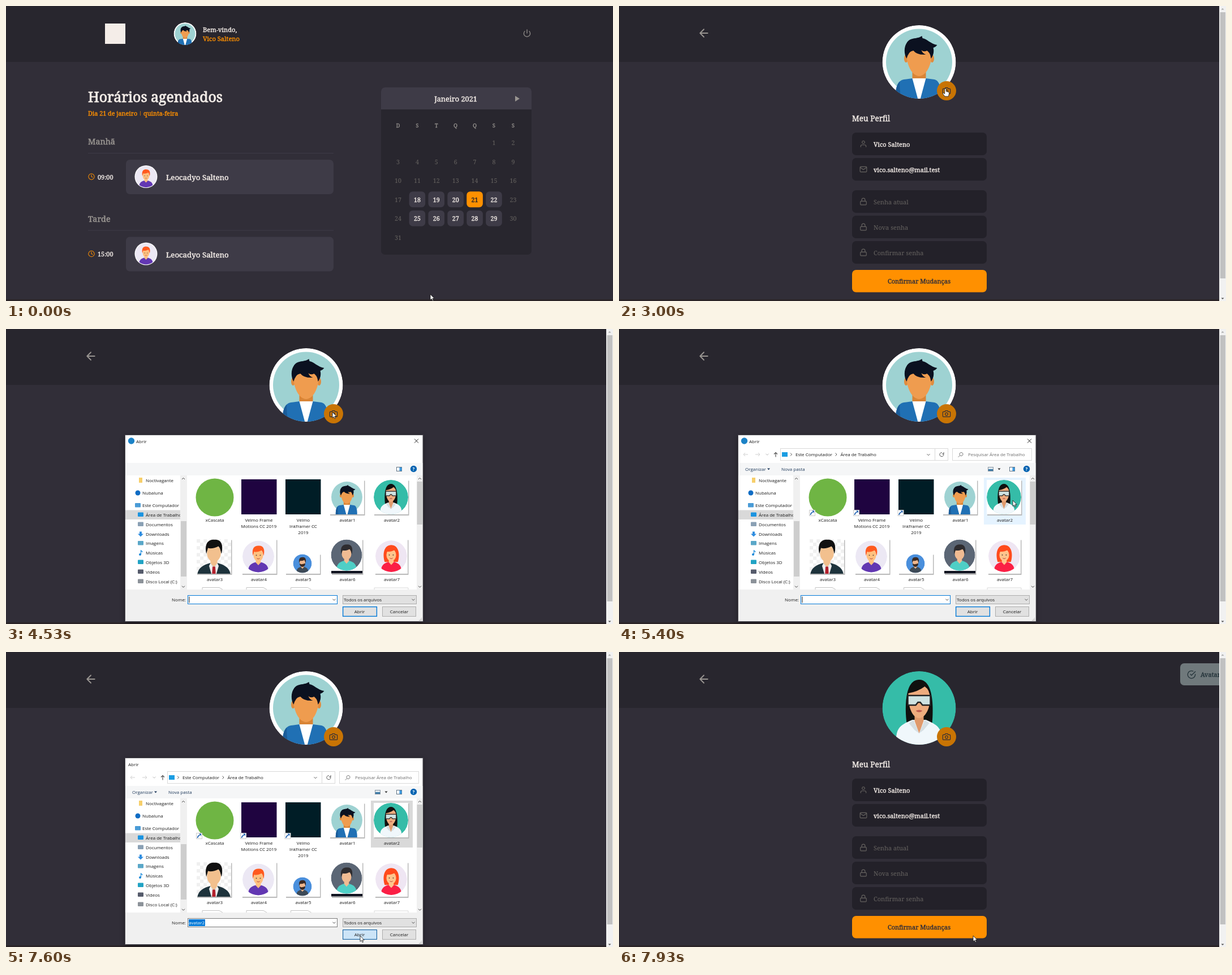
These frames come from a looping animation (1073 px wide and 522 px high, 8000 ms). An HTML page:

```html
<!DOCTYPE html>
<html lang="pt-BR">
<head>
<meta charset="utf-8">
<title>Perfil</title>
<style>
html, body { margin: 0; width: 100%; height: 100%; overflow: hidden; background: #312e38; }
svg { display: block; width: 100%; height: 100%; font-family: "Noto Serif", serif; }
#dialog, #status { font-family: "Open Sans", sans-serif; }
#dialog { filter: drop-shadow(0 2px 4px #0006); }
</style>
</head>
<body>
<svg id="stage" viewBox="0 0 1073 522"></svg>
<script>
const ORANGE = '#ff9000', LIGHT = '#f4ede8', GRAY = '#999591', DIM = '#666360',
  DARK = '#28262e', CARD = '#3e3b47', BLUE = '#0078d7';
const MID = 'text-anchor="middle"';

// Drawing helpers
const text = (x, y, size, fill, str, extra = '') =>
  `<text x="${x}" y="${y}" font-size="${size}" fill="${fill}" ${extra}>${str}</text>`;
const medium = (x, y, size, fill, str, extra = '') =>
  text(x, y, size, fill, str, `stroke="${fill}" stroke-width="${size * .035}" ${extra}`);
const rect = (x, y, w, h, fill, r = 0, extra = '') =>
  `<rect x="${x}" y="${y}" width="${w}" height="${h}" rx="${r}" fill="${fill}" ${extra}/>`;
const box = (x, y, w, h, fill, stroke, extra = '') =>
  rect(x + .5, y + .5, w - 1, h - 1, fill, 0, `stroke="${stroke}" ${extra}`);
const circle = (x, y, r, fill) => `<circle cx="${x}" cy="${y}" r="${r}" fill="${fill}"/>`;
const oval = (x, y, rx, ry, fill) => `<ellipse cx="${x}" cy="${y}" rx="${rx}" ry="${ry}" fill="${fill}"/>`;
const shape = (d, fill, extra = '') => `<path d="${d}" fill="${fill}" ${extra}/>`;
const line = (d, stroke, w = 1) => shape(d, 'none', `stroke="${stroke}" stroke-width="${w}"`);
const group = (id, ...parts) => `<g id="${id}">${parts.join('')}</g>`;
const icon = (x, y, size, color, d) =>
  `<g transform="translate(${x - size / 2} ${y - size / 2}) scale(${size / 24})" stroke-linecap="round" stroke-linejoin="round">${line(d, color, 2)}</g>`;
const chevron = (x, y, color = '#555') => line(`M${x - 2.5} ${y - 1.3}l2.5 2.5 2.5-2.5`, color);
const next = (x, y) => line(`M${x - 1} ${y - 2.5}l2.5 2.5-2.5 2.5`, '#555');

const ICON = {
  power: 'M18.36 6.64a9 9 0 1 1-12.73 0M12 2v10',
  clock: 'M12 2a10 10 0 1 0 .01 0M12 6v6l4 2',
  back: 'M19 12H5M12 19l-7-7 7-7',
  user: 'M20 21v-2a4 4 0 0 0-4-4H8a4 4 0 0 0-4 4v2M12 3a4 4 0 1 0 .01 0',
  mail: 'M4 4h16a2 2 0 0 1 2 2v12a2 2 0 0 1-2 2H4a2 2 0 0 1-2-2V6a2 2 0 0 1 2-2zM22 6l-10 7L2 6',
  lock: 'M5 11h14a2 2 0 0 1 2 2v7a2 2 0 0 1-2 2H5a2 2 0 0 1-2-2v-7a2 2 0 0 1 2-2zM7 11V7a5 5 0 0 1 10 0v4',
  camera: 'M23 19a2 2 0 0 1-2 2H3a2 2 0 0 1-2-2V8a2 2 0 0 1 2-2h4l2-3h6l2 3h4a2 2 0 0 1 2 2zM12 9a4 4 0 1 0 .01 0',
  check: 'M22 11.08V12a10 10 0 1 1-5.93-9.14M22 4 12 14.01l-3-3'
};

// Avatars, drawn around 0,0 with radius 65
const man = circle(0, 0, 65, '#fff') + circle(0, 0, 58.5, '#9ed2d2') +
  shape('M-42 66C-42 44-38 33-27 31L-12 29H12L27 31C36 33 39 45 39 66Z', '#2070b4') +
  shape('M-42 66C-42 48-39 38-34 35C-35 46-33 54-32 66Z', '#1a5c99') +
  shape('M-12 29H12L2 66H-2Z', '#fff') +
  shape('M-12 14H12V29H-12Z', '#d98435') +
  oval(-23, -6, 3.5, 7, '#e08c3e') + oval(23, -6, 3.5, 7, '#e08c3e') +
  shape('M-22-24H22C25 0 14 25 0 25S-25 0-22-24Z', '#ef9c4f') +
  shape('M-22-6C-28-16-27-32-17-39C-10-43-2-41 5-46L6-42C14-41 20-32 32-30Q29-26 25-25C27-18 25-11 21-6C20-13 19-16 14-20Q8-17 4-21Q6-15 12-13Q-4-12-10-20Q-16-19-18-15Q-21-11-22-6Z', '#0b1120');

const woman = circle(0, 0, 65, '#35bca8') +
  shape('M-22 27C-25 5-27-50 0-50S25 5 23 27Z', '#10110f') +
  shape('M-41 66C-41 38-38 32-12 21H12C38 32 40 38 41 66Z', '#f0f7fb') +
  shape('M-8 10H8V23L0 45-8 23Z', '#e09a6c') +
  shape('M-19-26Q-2-29 10-38Q19-32 19-18C20 2 10 18 0 18S-20 2-19-26Z', '#eeac7e') +
  shape('M-10 21L0 45-8 39-18 27ZM10 21L0 45 8 39 18 27Z', '#d6dfe3') +
  shape('M-20-22H20V-5H6L2-10H-2L-6-5H-20Z', '#cfe3e2', 'stroke="#222" stroke-width="2.5"') +
  shape('M-6 5Q0 2 6 5Q0 10-6 5Z', '#bf5b4f');

const person = (bg, hair, skin, shirt, { w = 42, long = 0, face = 0, beard = 0, tie = 0 } = {}) =>
  (bg ? circle(0, 0, 65, bg) : '') +
  (long ? shape('M-27 24C-38-12-28-46 0-46S38-12 27 24Z', hair) : '') +
  shape(`M${-w} 66C${-w} 38-32 30-12 24H12C32 30 ${w} 38 ${w} 66Z`, shirt) +
  shape('M-10 6H10V25L0 36-10 25Z', skin) +
  (tie ? shape('M-10 24L0 36 10 24 14 32 4 66H-4L-14 32Z', '#eee') + shape('M-4 34H4L6 66H-6Z', '#b3202c') : '') +
  oval(0, -5, 20, 25, skin) +
  (beard ? shape('M-20-2Q-14 7 0 4T20-2C20 32-20 32-20-2Z', hair) : '') +
  shape('M-22-3C-28-34-16-45 2-44C22-45 28-28 22-3C19-12 19-19 13-25C4-20-10-17-17-20C-19-13-20-10-22-3Z', hair) +
  (face ? circle(-8, -5, 2.2, '#333') + circle(8, -5, 2.2, '#333') + line('M-6 8Q0 13 6 8', '#a33', 2) : '');

const redhead = person('#ece8f4', '#ff5a1f', '#ffc07f', '#6237b2', { face: 1 });
const suit = `<g transform="translate(0 -6) scale(1.3)">${person('', '#111', '#f2c08e', '#1e333c', { w: 49, tie: 1 })}</g>`;
const avatar = (x, y, r, art, clip = 'round') =>
  `<g transform="translate(${x} ${y}) scale(${r / 65})"><g clip-path="url(#${clip})">${art}</g></g>`;

// Dashboard
const appointment = (title, time, y) =>
  medium(145, y - 57, 14.3, GRAY, title) +
  rect(145, y - 42, 434, 1, CARD) +
  rect(212, y - 30, 367, 61, CARD, 7) +
  icon(151, y, 12.5, ORANGE, ICON.clock) +
  medium(162, y + 4.5, 10.9, LIGHT, time) +
  circle(247.5, y, 20, '#fff') + avatar(247.5, y, 19, redhead) +
  medium(283, y + 6, 13.3, LIGHT, 'Leocadyo Salteno');

function calendar() {
  let s = rect(663, 144, 266, 296, DARK, 7) +
    shape('M663 183V151a7 7 0 0 1 7-7H922a7 7 0 0 1 7 7V183Z', CARD) +
    medium(795, 168.5, 12.7, LIGHT, 'Janeiro 2021', MID) +
    shape('M900 159V169L908 164Z', GRAY);
  [...'DSTQQSS'].forEach((d, i) => s += medium(693 + 33.9 * i, 214.5, 9, GRAY, d, MID));
  for (let day = 1; day <= 31; day++) {
    const col = (day + 4) % 7, x = 693 + 33.9 * col, y = 242 + 33.5 * Math.floor((day + 4) / 7);
    const open = day > 17 && day < 30 && col > 0 && col < 6, chosen = day === 21;
    if (open) s += rect(x - 14.3, y - 14.3, 28.6, 28, chosen ? ORANGE : CARD, 6.5);
    s += (open ? medium : text)(x, y + 4, 10.7, chosen ? '#232129' : open ? LIGHT : DIM, day, MID);
  }
  return s;
}

const dashboard = group('dashboard',
  rect(0, 0, 1073, 99, DARK),
  rect(175, 31, 36, 36, LIGHT),
  avatar(316.5, 49, 20, man),
  medium(348, 45.5, 11.1, LIGHT, 'Bem-vindo,'),
  medium(348, 62, 11.1, ORANGE, 'Vico Salteno'),
  icon(921, 48, 15, GRAY, ICON.power),
  medium(145, 170, 24.9, LIGHT, 'Horários agendados'),
  medium(145, 194, 10.8, ORANGE, 'Dia 21 de janeiro'),
  rect(237, 186, 1, 8, '#b86c0c'),
  medium(243, 194, 10.8, ORANGE, 'quinta-feira'),
  appointment('Manhã', '09:00', 302), appointment('Tarde', '15:00', 438.5),
  calendar());

// Profile
const field = (y, ic, str, color) =>
  rect(412, y, 238, 40, '#232129', 7) + icon(432, y + 20, 14, DIM, ICON[ic]) +
  (color === LIGHT ? medium : text)(450, y + 24.5, 11, color, str);

const profile = group('profile',
  rect(0, 0, 1061, 99, DARK),
  icon(150, 48, 23, GRAY, ICON.back),
  group('before', avatar(530.5, 99, 65, man)),
  group('after', avatar(530.5, 99, 65, woman)),
  `<circle id="shot" cx="579" cy="150" r="17"/>`,
  icon(579, 150, 14.5, '#312e38', ICON.camera),
  medium(412, 203.5, 13.6, LIGHT, 'Meu Perfil'),
  field(224, 'user', 'Vico Salteno', LIGHT),
  field(269, 'mail', 'vico.salteno@mail.test', LIGHT),
  field(326, 'lock', 'Senha atual', DIM),
  field(371, 'lock', 'Nova senha', DIM),
  field(416, 'lock', 'Confirmar senha', DIM),
  rect(412, 467, 238, 39.5, ORANGE, 7),
  medium(530.5, 491.3, 11, '#312e38', 'Confirmar Mudanças', MID),
  group('toast',
    rect(0, 20, 252, 39, '#e6fffa', 7),
    icon(20, 40, 16, '#1d4a4e', ICON.check),
    medium(36, 44, 11, '#1d4a4e', 'Avatar atualizado!')));

const scrollbar = group('scroll',
  rect(1061, 0, 12, 522, '#f1f1f1'), rect(1062.5, 11, 9.5, 471, '#c1c1c1'),
  shape('M1064.500 6.500L1067 4 1069.500 6.500Z', '#a3a3a3'), shape('M1064.500 516.500L1067 519 1069.500 516.500Z', '#505050'));

// File dialog
const label = (x, y, str, extra = '') => text(x, y, 8, '#1a1a1a', str, extra);
const places = [
  [267.5, 'Noctivagante', '#f7cf6b'], [290, 'Nubaluna', '#0f6cc4', 1], [312, 'Este Computador', '#4a9bd6', 1],
  [328.5, 'Área de Trabalho', '#1b94e0'], [345.5, 'Documentos', '#8aa0b4'], [362.5, 'Downloads', '#2f8de0'],
  [379, 'Imagens', '#5aa7c8'], [396, 'Músicas', '#1687d9'], [412.5, 'Objetos 3D', '#21a3c4'],
  [429.5, 'Vídeos', '#555b6b'], [446.5, 'Disco Local (C:)', '#8c9299']
];
const placeMark = (x, y, name, color) =>
  name === 'Nubaluna' ? circle(x + 5, y, 4.5, color) :
  name === 'Downloads' ? shape(`M${x + 3} ${y - 4}h4v4h3l-5 5-5-5h3z`, color) :
  name === 'Músicas' ? circle(x + 4, y + 3, 2, color) + line(`M${x + 5.5} ${y + 3}v-7l3 2.5`, color, 1.2) :
  name === 'Noctivagante' ? rect(x + 2, y - 4.5, 6, 9, color) : rect(x, y - 4, 10, 7.5, color, 1);

const nav = rect(211, 320.5, 97, 16.5, '#d9d9d9') +
  places.map(([y, name, color, outer]) =>
    placeMark(outer ? 228 : 233, y, name, color) + label(outer ? 241 : 247, y + 3, name)).join('') +
  rect(308, 259, 12, 202, '#f0f0f0') + rect(309, 340, 10, 98, '#cdcdcd') +
  line('M311 266l2.5-2.5 2.5 2.5', '#444') + chevron(313.5, 456, '#444');

const cols = [369, 447, 525.5, 603.5, 682];
const frame = (x, y, w = 61, h = 61) => rect(x + 1, y + 1.5, w + .5, h + .5, '#b9b9b9') + rect(x, y, w, h, '#fff');

function files() {
  let s = circle(369, 298, 33.5, '#6fb544') + rect(416, 266, 62.5, 62, '#1f0440') + rect(494, 266, 62.5, 62, '#001d26');
  s += frame(572, 267) + avatar(602.5, 297.5, 30.5, man, 'square');
  s += frame(650, 267) + avatar(680.5, 297.5, 30.5, woman);
  s += frame(337, 372);
  for (let i = 0; i < 50; i++) s += rect(337 + i % 5 * 12.2 + (Math.floor(i / 5) % 2) * 6.1, 372 + Math.floor(i / 5) * 6.1, 6.1, 6.1, '#f0f0f0');
  s += avatar(367.5, 402.5, 30.5, suit, 'square');
  s += frame(417, 372) + avatar(446, 402.5, 28, redhead);
  s += frame(494, 398, 61, 35) + avatar(524, 415, 16.5, person('#4a8fdc', '#3b2a24', '#f0b78d', '#3d4a57', { beard: 1 }));
  s += frame(575, 372, 55) + avatar(602, 400, 27.5, person('#5b6675', '#2e2c2f', '#f0bb92', '#4fcfc6')) + rect(575, 428, 55, 4.5, '#10131f');
  s += frame(652, 372, 58) + avatar(681, 402, 28, person('#efe6f3', '#ff4a1c', '#ffc48c', '#fb1f45', { long: 1, face: 1 }));
  cols.slice(0, 3).forEach(x => s += line(`M${x - 22} 461V457.500H${x + 8}L${x + 14} 461`, '#c4c4c4'));
  s += line('M651 461V458H711V461', '#d8d8d8');
  [['xCascata'], ['Velmo Frame', 'Motions CC 2019'], ['Velmo', 'Inkframer CC', '2019'], ['avatar1'], ['avatar2']]
    .forEach((rows, i) => rows.forEach((row, j) => s += label(cols[i], 341 + 11 * j, row, MID)));
  cols.forEach((x, i) => s += label(x, 446, 'avatar' + (i + 3), MID));
  return s;
}

const shortcuts = group('shortcuts', ...cols.slice(0, 3).map(x =>
  box(x - 33, 320, 11, 11, '#fff', '#ccc') + line(`M${x - 30.5} 329Q${x - 30} 325 ${x - 26} 324`, '#1c5fb0', 1.8) +
  shape(`M${x - 28} 321.500h4v4z`, '#1c5fb0')));

const address = group('address',
  line('M228 222H220M223 219l-3 3 3 3M241 222h8M246 219l3 3-3 3', '#cfcfcf'), chevron(262, 222, '#bbb'),
  line('M277 226.500V218.500M274 221.500l3-3 3 3', '#555', 1.2),
  box(285, 211, 297, 22, '#fff', '#d9d9d9'), rect(558, 211, 1, 22, '#d9d9d9'),
  rect(288, 218, 10, 8, '#1b9de2'), next(304, 222), label(312, 225, 'Este Computador'),
  next(383.5, 222), label(391.5, 225, 'Área de Trabalho'), chevron(547, 222.500),
  line('M573.500 220.500a3.500 3.500 0 1 1-2.500-1.800M574 218v3h-3', '#555'),
  box(589, 211, 141, 22, '#fff', '#d9d9d9'),
  line('M605 218.500a3 3 0 1 0 .01 0M602.700 223.700l-3 3', '#777'),
  text(617, 225, 7.9, '#6d6d6d', 'Pesquisar Área de Trabalho'),
  text(223, 251, 8, '#1e395b', 'Organizar'), shape('M262 246.500h5l-2.500 3z', '#1e395b'),
  text(287, 251, 8, '#1e395b', 'Nova pasta'),
  box(652, 244, 10, 8, '#dfe8ee', '#8a97a3'), rect(653, 248, 8, 3, '#3c7ba8'), shape('M669.500 246.500h5l-2.500 3z', '#333'));

const dialog = group('dialog',
  rect(210, 187, 527.5, 331, '#55535a'),
  rect(211, 188, 525.5, 329, '#fff'),
  rect(211, 461, 525.5, 56, '#f0f0f0'),
  group('mark', circle(221.5, 198, 5.7, '#1b82c6'), line('M722 194.500l7 7M729 194.500l-7 7', '#222')),
  `<text id="caption" y="201.500" font-size="8" fill="#1a1a1a">Abrir</text>`,
  group('content',
    rect(211, 237, 525.5, 22, '#f5f6f7'),
    box(690, 244, 10, 8, '#fff', '#5f7283'), rect(695.5, 245, 4, 6, '#3d9ae0'),
    circle(720.5, 247.5, 5.7, '#0063b1'), text(720.5, 250.5, 8, '#fff', '?', MID + ' font-weight="700"'),
    nav,
    `<rect id="tile" x="645.500" y="263.500" width="73" height="82"/>`,
    files(),
    rect(726, 259, 10.5, 202, '#f0f0f0'), rect(726.5, 270, 10, 76, '#cdcdcd'),
    line('M729 266l2.500-2.500 2.500 2.500', '#444'), chevron(731.5, 456, '#444')),
  shortcuts, address,
  label(318, 482, 'Nome:', 'text-anchor="end"'),
  box(321, 471, 265, 16, '#fff', BLUE, 'id="name"'), chevron(580, 479),
  rect(323, 473, 29, 12, BLUE, 0, 'id="marked"'),
  `<text id="file" x="323" y="482" font-size="8">avatar2</text>`,
  rect(323.5, 473.5, .9, 11, '#000', 0, 'id="caret"'),
  box(595, 471, 131, 16, '#e1e1e1', '#adadad'), label(597, 482, 'Todos os arquivos'), chevron(720, 479),
  rect(595.6, 491.6, 59.8, 16.8, '#e1e1e1', 0, 'id="open"'),
  label(625, 503, 'Abrir', MID),
  box(665, 491, 60, 18, '#e1e1e1', '#adadad'), label(695, 503, 'Cancelar', MID),
  line('M730 515.500h5M732.500 513.500h2.500M734 511.500h1', '#b5b5b5', 1.2));

const cursor = group('cursor',
  shape('M0 0V10.300L2.400 8.200L4 11.800L5.600 11.100L4 7.600H7.200Z', '#fff', 'id="arrow" stroke="#111" stroke-width=".8"'),
  shape('M-1.300 1.200a1.300 1.300 0 0 1 2.600 0V5l4 1.200q1.500.5 1.300 2L6 11.500 5.200 14H-1L-4.500 9.500q-.6-1.600 1-1.700l2.200 1.500z', '#fff', 'id="hand" stroke="#111" stroke-width=".8"'));

document.getElementById('stage').innerHTML =
  `<defs><clipPath id="round"><circle r="65"/></clipPath><clipPath id="square"><rect x="-65" y="-65" width="130" height="130"/></clipPath></defs>` +
  rect(0, 0, 1073, 522, '#312e38') + dashboard + profile +
  rect(0, 519, 1073, 3, '#2b2528') +
  group('status', rect(3, 514, 80, 10, '#e6e6e6', 2), text(7, 524, 7.2, '#555', 'localhost:3000/profile')) +
  scrollbar + dialog + cursor;

// Motion
const $ = id => document.getElementById(id);
const show = (id, on) => $(id).style.display = on ? '' : 'none';
const set = (id, attrs) => Object.entries(attrs).forEach(([k, v]) => $(id).setAttribute(k, v));
const ramp = (t, a, b) => Math.min(1, Math.max(0, (t - a) / (b - a)));
const ease = p => p * p * (3 - 2 * p);

const path = [[100, 750, 510], [930, 384, 82], [1330, 373, 59], [2400, 373, 59], [3000, 577, 146], [4530, 577, 147],
  [5270, 704, 296], [5670, 672, 325], [5900, 672, 325], [6200, 658, 335], [6400, 658, 335], [6740, 632, 479], [7130, 626, 502]];
function pointer(t) {
  let i = path.findIndex(k => k[0] > t);
  if (i < 0) i = path.length;
  const a = path[Math.max(0, i - 1)], b = path[Math.min(i, path.length - 1)];
  const p = a === b ? 0 : ease(ramp(t, a[0], b[0]));
  return [a[1] + (b[1] - a[1]) * p, a[2] + (b[2] - a[2]) * p];
}

function draw(now) {
  const t = Math.floor((now % 8000 + 5) * .015) / .015;
  const onProfile = t > 1510, picked = t > 6180, pressed = t > 7450;
  const [x, y] = pointer(t);

  show('dashboard', !onProfile);
  show('profile', onProfile);
  show('scroll', onProfile);
  show('before', t < 7850);
  show('after', t > 7850);
  set('shot', { fill: t > 2850 ? '#c87404' : ORANGE });
  set('status', { opacity: t < 1120 ? 0 : 1 - ramp(t, 2000, 2260) });

  const slide = ramp(t, 7800, 7933);
  show('toast', slide > 0);
  set('toast', { opacity: .38 * slide, transform: `translate(${1061 - 69 * slide} 0)` });

  const seen = t < 7650 ? 1 - (1 - ramp(t, 3970, 4270)) ** 2 : 1 - ramp(t, 7600, 7800);
  const k = .95 + .05 * seen;
  show('dialog', seen > 0);
  set('dialog', { opacity: seen, transform: `translate(474 352.5) scale(${k}) translate(-474 -352.5)` });
  show('content', t > 4310);
  show('address', t > 4590);
  show('shortcuts', t > 4850);
  show('mark', !pressed);
  set('caption', { x: pressed ? 216 : 230 });

  const over = x > 645 && x < 719 && y > 263 && y < 346;
  const [fill, stroke] = pressed ? ['#d9d9d9', '#d9d9d9'] : picked ? ['#cce8ff', over ? '#99d1ff' : '#cce8ff'] : ['#e5f3ff', '#e5f3ff'];
  show('tile', picked || over);
  set('tile', { fill, stroke });
  show('file', picked);
  show('marked', pressed);
  set('file', { fill: pressed ? '#fff' : '#1a1a1a' });
  set('name', { stroke: picked ? '#7a7a7a' : BLUE });
  show('caret', t > 4310 && !picked && Math.floor((t - 4310) / 530) % 2 === 0);
  set('open', {
    fill: pressed ? '#cce4f7' : y > 491 && t > 6800 ? '#e5f1fb' : '#e1e1e1',
    stroke: pressed ? '#005499' : BLUE, 'stroke-width': pressed ? 1 : 1.4
  });

  const hand = t > 1120 && t < 1850 || t > 2850 && t < 3650;
  show('hand', hand);
  show('arrow', !hand);
  set('cursor', { transform: `translate(${x} ${y})` });
}

function tick() {
  draw(performance.now());
  requestAnimationFrame(tick);
}
tick();
</script>
</body>
</html>
```
